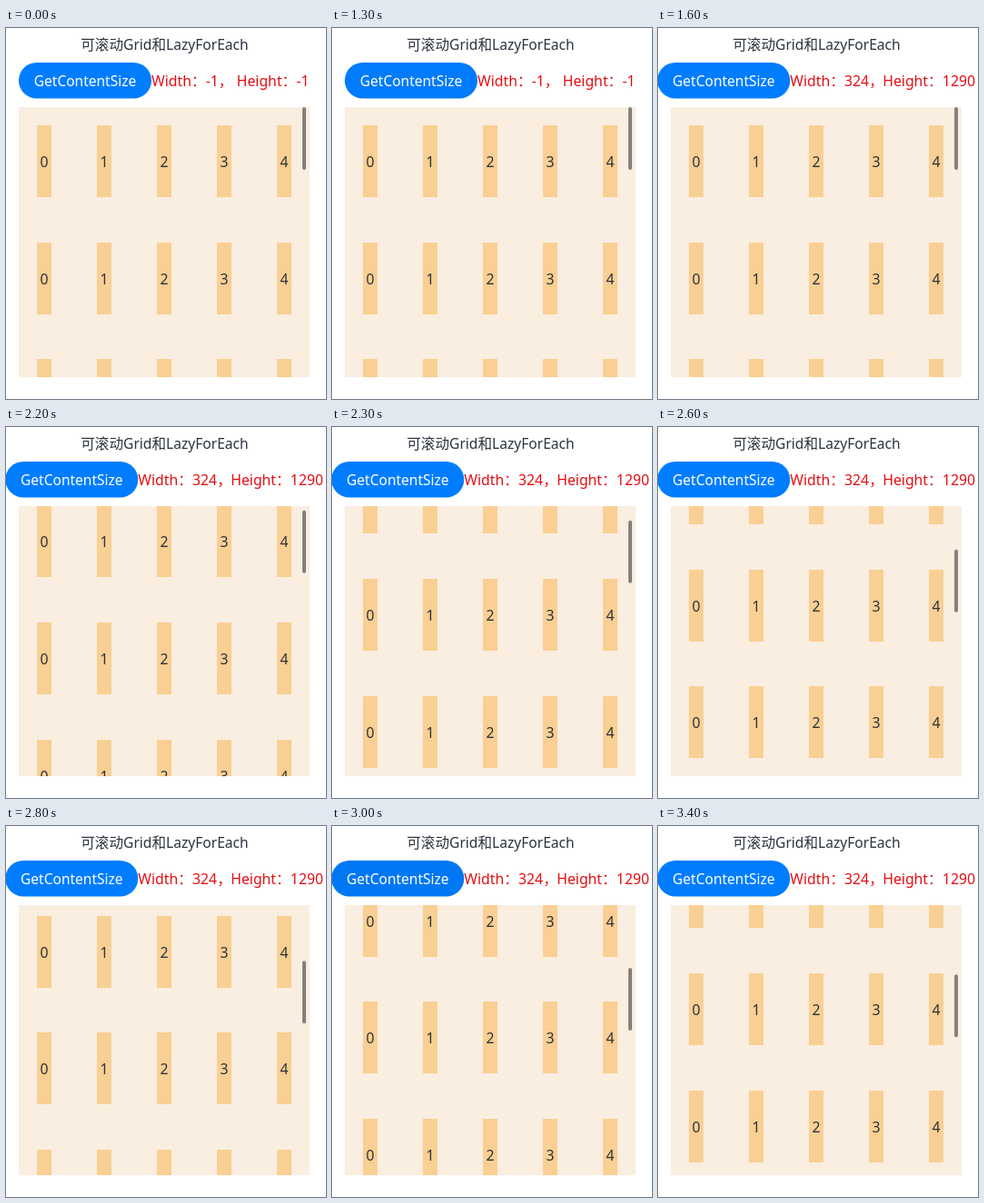
These frames come from a looping animation (352 px wide and 408 px high, 4000 ms). An HTML page with a canvas:

```html
<!DOCTYPE html>
<html lang="zh-CN">
<head>
<meta charset="utf-8">
<title>Scrollable grid</title>
<style>
  html, body { margin: 0; width: 100%; height: 100%; overflow: hidden; background: #fff; }
  canvas { display: block; }
</style>
</head>
<body>
<canvas id="stage" width="352" height="408"></canvas>
<script>
const ctx = document.getElementById('stage').getContext('2d');
const LOOP = 4000, STEP = 100;
const FONTS = '"Noto Sans", "Noto Sans CJK SC", "Noto Sans CJK JP", sans-serif';
const INK = '#2b333e', RED = '#e60d12';
const VIEW = { x: 14, y: 87, w: 320, h: 297 };
const CONTENT_HEIGHT = 1290, ROW_PITCH = 128.7, COLUMN_PITCH = 66;

function text(str, x, y, color, align = 'center', weight = 400, size = 15.8) {
  ctx.font = `${weight} ${size}px ${FONTS}`;
  ctx.fillStyle = color;
  ctx.textAlign = align;
  ctx.fillText(str, x, y);
}

function pill(x, y, w, h, color) {
  ctx.fillStyle = color;
  ctx.beginPath();
  ctx.roundRect(x, y, w, h, Math.min(w, h) / 2);
  ctx.fill();
}

// A steady drag, then a fling slowed by friction until it stops.
function scrollAt(t) {
  if (t < 2200) return 0;
  if (t < 2500) return 20.7 + (t - 2200) * 0.48;
  return 347.5 - 182.7 * Math.exp(-0.00268 * (Math.min(t, 3400) - 2500));
}

// Button darkening while pressed, from 0 to 1.
function pressAt(t) {
  const ramp = (from, to) => Math.max(0, Math.min(1, (t - from) / 150, (to - t) / 150));
  return Math.max(ramp(1250, 1600), ramp(2800, 3300));
}

function drawHeader(t) {
  const measured = t >= 1500;
  const left = measured ? -0.7 : 14;
  const [width, height] = measured ? [324, 1290] : [-1, -1];
  const press = pressAt(t);
  text('可滚动Grid和LazyForEach', 174.5, 24, INK, 'center', 400, 15.6);
  pill(left, 38, 146, 39.5, `rgb(0, ${125 - 6 * press}, ${255 - 12 * press})`);
  text('GetContentSize', left + 73, 63.5, '#fff', 'center', 500, 15.5);
  text(`Width：${width}，`, left + 146, 63.5, RED, 'left');
  text(`Height：${height}`, measured ? 349 : 333.5, 63.5, RED, 'right');
}

function drawGrid(scroll) {
  ctx.save();
  ctx.beginPath();
  ctx.rect(VIEW.x, VIEW.y, VIEW.w, VIEW.h);
  ctx.clip();
  ctx.fillStyle = '#faeee0';
  ctx.fillRect(VIEW.x, VIEW.y, VIEW.w, VIEW.h);
  for (let row = 0; row < 10; row++) {
    const y = Math.round(107 + row * ROW_PITCH - scroll);
    for (let col = 0; col < 5; col++) {
      const x = 34 + col * COLUMN_PITCH;
      ctx.fillStyle = '#f9cf93';
      ctx.fillRect(x, y, 16, 79);
      text(col, x + 8, y + 45.5, INK);
    }
  }
  pill(326, VIEW.y + scroll * VIEW.h / CONTENT_HEIGHT, 4, 69, '#85807b');
  ctx.restore();
}

function draw(now) {
  const t = Math.floor((now % LOOP) / STEP) * STEP;
  ctx.fillStyle = '#fff';
  ctx.fillRect(0, 0, 352, 408);
  drawHeader(t);
  drawGrid(scrollAt(t));
  requestAnimationFrame(draw);
}
const start = performance.now();
draw(0);
function loop() {}
</script>
</body>
</html>
```
